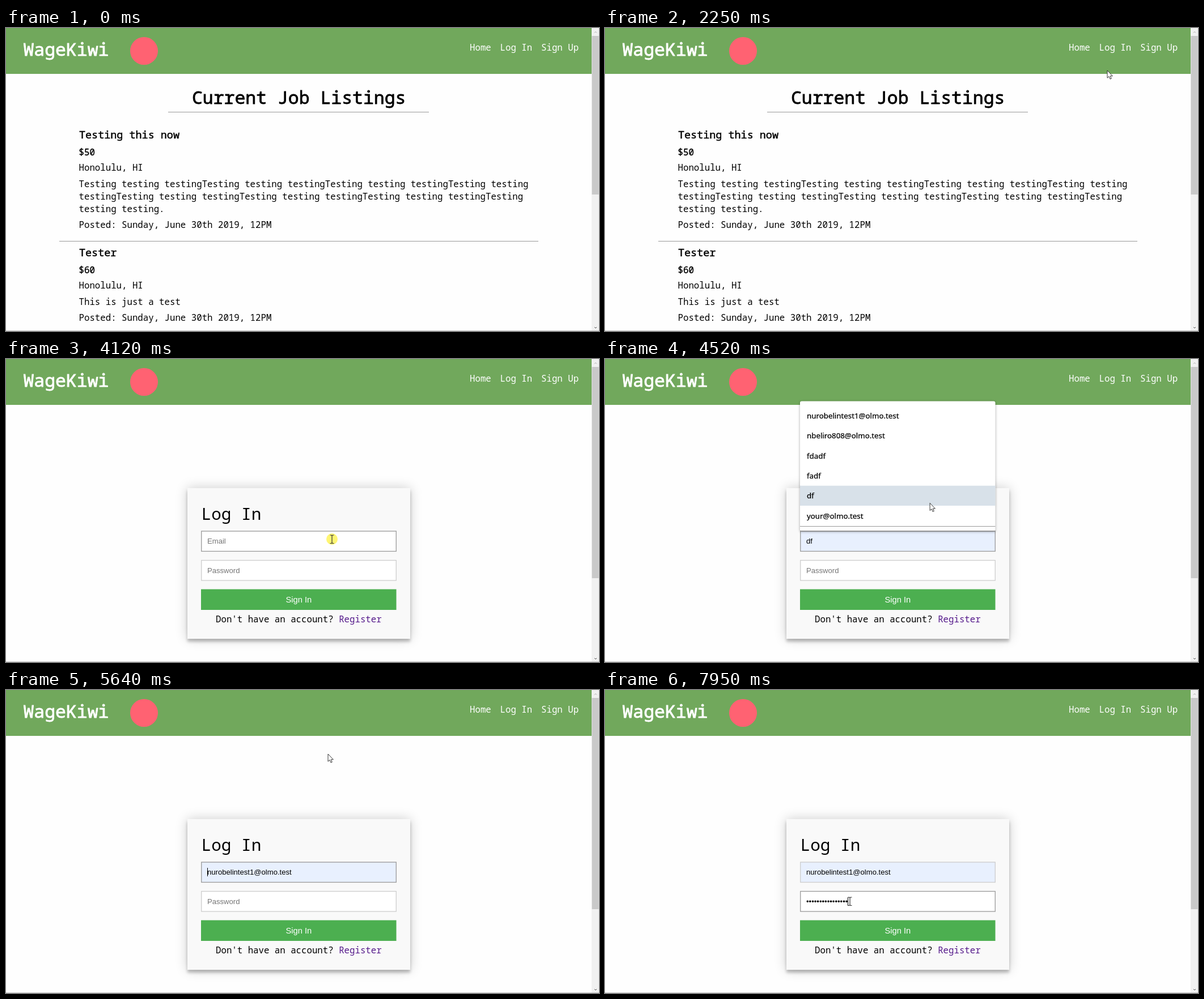
Recreate the animation shown at these times as an HTML page. Size 1046 by 535 pixels, loop 8 s.

```html
<!DOCTYPE html>
<html lang="en">
<head>
<meta charset="utf-8">
<title>Job listings</title>
<style>
  html, body { margin: 0; width: 100%; height: 100%; overflow: hidden; background: #fefefe; }
  div, svg { position: absolute; }
  svg { left: 0; top: 0; }
  text { font: 15.74px "Noto Sans Mono", monospace; white-space: pre; }
  .card { left: 94px; width: 845px; height: 207px; box-shadow: 0 3px 8px rgba(0,0,0,.16); }
  .form { left: 320px; top: 228px; width: 393px; height: 266px; background: #f9f9f9;
    box-shadow: 0 0 20px rgba(0,0,0,.2), 0 5px 5px rgba(0,0,0,.24); }
  .brand, .title { font-size: 31.46px; }
  .job { font-size: 18.44px; }
  /* thin outlines give the medium weights */
  .brand { stroke: #fff; stroke-width: .9px; }
  .title { stroke: #000; stroke-width: .8px; }
  .job { stroke: #000; stroke-width: .5px; }
  .pay { stroke: #000; stroke-width: .4px; }
  .field { font: 13.1px "Liberation Sans", Arial, sans-serif; }
  .button { font: 14.7px "Liberation Sans", Arial, sans-serif; }
  .row { font: 13.3px "Noto Sans", sans-serif; stroke: #000; stroke-width: .25px; }
  .status { font: 14.2px "Noto Sans", sans-serif; fill: #444; }
  #menu { filter: drop-shadow(0 1px 2px rgba(0,0,0,.35)); }
  .line { stroke: #999; }
  .pointer { fill: #fff; stroke: #222; stroke-linejoin: round; }
</style>
</head>
<body>
<div id="card1" class="card" style="top:170px"></div>
<div id="card2" class="card" style="top:377px"></div>
<div id="form" class="form"></div>
<svg width="1046" height="535" viewBox="0 0 1046 535">
  <rect width="1033" height="81" fill="#71a85c"/>
  <circle cx="243.5" cy="40.5" r="24.5" fill="#ff6272"/>
  <g fill="#fff">
    <text class="brand" x="30.5" y="49">WageKiwi</text>
    <text x="818" y="40">Home</text>
    <text x="871.5" y="40">Log In</text>
    <text x="944" y="40">Sign Up</text>
  </g>

  <g id="listings">
    <text class="title" x="328" y="134">Current Job Listings</text>
    <path class="line" d="M286 148.5H746M94 376.5H939"/>
    <g id="jobs"></g>
    <g id="status">
      <path d="M0 513.5H127q3 0 3 3V535H0Z" fill="#fdfdfd"/>
      <path d="M0 513.5H127q3 0 3 3" fill="none" stroke="#ccc"/>
      <text class="status" x="3" y="531">localsite:4100/enter</text>
    </g>
  </g>

  <g id="login">
    <text x="344.5" y="284" style="font-size:29.4px">Log In</text>
    <rect id="emailBox" x="344.75" y="304" width="343.5" height="35.5" stroke-width="1.3"/>
    <text id="email" class="field" x="355" y="326"></text>
    <rect id="passBox" x="344.75" y="355.5" width="343.5" height="35.5" stroke-width="1.3" fill="#fff"/>
    <text id="pass" class="field" x="355" y="378"></text>
    <rect x="344" y="406.5" width="344.5" height="36.5" fill="#4caf50"/>
    <text class="button" x="516.3" y="430" text-anchor="middle" fill="#fff">Sign In</text>
    <text x="370" y="465">Don't have an account? <tspan fill="#551a8b">Register</tspan></text>
    <path id="caret" stroke="#000" d="M0 0v15"/>
    <g id="menu">
      <rect x="344" y="74.5" width="344.5" height="229" rx="3" fill="#fff"/>
      <rect id="pick" x="344" width="344.5" height="35.3" fill="#d8e1e9"/>
      <path class="line" d="M344 295.5H688.5M344 303.5H688.5"/>
      <g id="rows"></g>
    </g>
  </g>

  <rect x="1033" width="13" height="535" fill="#f1f1f1"/>
  <rect id="thumb" x="1033.5" y="14" width="12" fill="#c9c9c9"/>
  <path d="M1038 8.5l2-2 2 2" fill="none" stroke="#aaa"/>
  <path d="M1038 528l2 2 2-2" fill="none" stroke="#555"/>
  <path d="M0 534.5H1046" stroke="#c8c8c8"/>

  <g id="cursor">
    <circle id="click" r="10" fill="#fe0" opacity=".55"/>
    <path id="arrow" class="pointer" stroke-width=".9" d="M0 0V13.2L3 10.5 5 15.2 7.2 14.2 5.2 9.8H9.3Z"/>
    <path id="hand" class="pointer" stroke-width="1" d="M-1.5 1.5a1.5 1.5 0 0 1 3 0V6l4.6 1q1.8.6 1.5 3L6.5 16H-.5L-5 10.5q-1-1.7.6-2.2L-1.5 10Z"/>
    <path id="beam" fill="none" stroke="#333" stroke-width="1.2" d="M-3.5-7h2.5l1 1 1-1h2.5M-3.5 7.5h2.5l1-1 1 1h2.5M0-6V6.5"/>
  </g>
</svg>
<script>
const $ = id => document.getElementById(id);
const show = (id, on) => { $(id).style.display = on ? '' : 'none'; };
const within = (v, a, b) => v >= a && v < b;
const set = (id, attrs) => { for (const k in attrs) $(id).setAttribute(k, attrs[k]); };
const text = (x, y, s, cls = '') => `<text class="${cls}" x="${x}" y="${y}">${s}</text>`;

const ROW = 35.3, ROW_TOP = 82.5;
const options = ['nurobelintest1@olmo.test', 'nbeliro808@olmo.test', 'fdadf', 'fadf', 'df', 'your@olmo.test'];
const triple = 'Testing testing testing';

const job = (y, name, pay, lines) =>
  text(129, y, name, 'job') + text(128.5, y + 30, pay, 'pay') + text(128.5, y + 57.5, 'Honolulu, HI') +
  lines.map((s, i) => text(128.5, y + 86 + 22 * i, s)).join('') +
  text(128.5, y + 92 + 22 * lines.length, 'Posted: Sunday, June 30th 2019, 12PM');

$('jobs').innerHTML =
  job(194.5, 'Testing this now', '$50', [
    triple.repeat(3) + 'Testing testing',
    'testing' + triple.repeat(3) + 'Testing',
    'testing testing.']) +
  job(402.5, 'Tester', '$60', ['This is just a test']);
$('rows').innerHTML = options.map((s, i) => text(356, 105 + ROW * i, s, 'row')).join('');

// time, x, y, eased arrival
const path = [
  [440, 700, 522], [750, 915, 455], [1000, 950, 340], [1205, 943, 225], [1230, 915, 208],
  [1300, 850, 178], [1380, 750, 154], [2080, 886, 75, 1], [2250, 886, 75], [2470, 897, 36, 1],
  [3200, 897, 36], [4040, 575, 318, 1], [4300, 575, 318], [4830, 570, 149, 1], [5150, 569, 128, 1],
  [5250, 569, 128], [5400, 568, 113], [5890, 568, 113], [6480, 432, 373, 1], [8000, 432, 373]
];
const clicks = [[2940, 3100], [4120, 4190], [5560, 5640], [6940, 7020]];

function pointerAt(t) {
  const i = Math.max(1, path.findIndex(k => k[0] > t));
  const [t0, x0, y0] = path[i - 1], [t1, x1, y1, eased] = path[i];
  let p = Math.max(0, (t - t0) / (t1 - t0));
  if (eased) p = p * p * (3 - 2 * p);
  return [x0 + (x1 - x0) * p, y0 + (y1 - y0) * p];
}

function caretAt(t) {
  if (within(t, 5640, 5720)) return [355.5, 314];
  if (within(t, 5720, 6220) || within(t, 6710, 6940)) return [504.5, 314];
  if (within(t, 6940, 7490)) return [355.5, 366];
  if (t >= 7950) return [428.5, 366];
}

function draw(t) {
  const [x, y] = pointerAt(t);
  const login = t >= 3250, menu = within(t, 4190, 5640), moved = t >= 440;

  show('listings', !login);
  show('login', login);
  show('form', login);
  set('thumb', { height: login ? 373 : 280 });

  const overCards = moved && !login && within(x, 94, 939);
  show('card1', overCards && within(y, 170, 376));
  show('card2', overCards && y >= 377);

  const hand = within(y, 26, 48) && within(x, 872, 928);
  const fieldX = within(x, 344, 689);
  const beam = login && fieldX && (within(y, 304, 340) || within(y, 355, 391));
  show('cursor', moved);
  set('cursor', { transform: `translate(${x} ${y})` });
  show('hand', hand);
  show('beam', beam);
  show('arrow', !hand && !beam);
  show('status', hand);
  show('click', clicks.some(([a, b]) => within(t, a, b)));

  let row = -1;
  if (menu && within(y, ROW_TOP, 294)) row = Math.floor((y - ROW_TOP) / ROW);
  show('menu', menu);
  show('pick', row >= 0);
  if (row >= 0) set('pick', { y: ROW_TOP + ROW * row });

  const email = t >= 5640 ? options[0] : options[row];
  $('email').textContent = email || 'Email';
  set('email', { fill: email ? '#000' : '#757575' });
  set('emailBox', {
    fill: email ? '#e8f0fe' : '#fff',
    stroke: within(t, 4120, 6940) ? '#999' : '#ccc'
  });
  const typed = t >= 7950;
  $('pass').textContent = typed ? '•'.repeat(16) : 'Password';
  set('pass', { fill: typed ? '#000' : '#757575' });
  set('passBox', { stroke: t >= 6940 ? '#999' : '#ccc' });

  const caret = caretAt(t);
  show('caret', caret);
  if (caret) set('caret', { transform: `translate(${caret})` });
}

const start = performance.now();
function tick() {
  draw((performance.now() - start) % 8000);
  requestAnimationFrame(tick);
}
tick();
</script>
</body>
</html>
```
